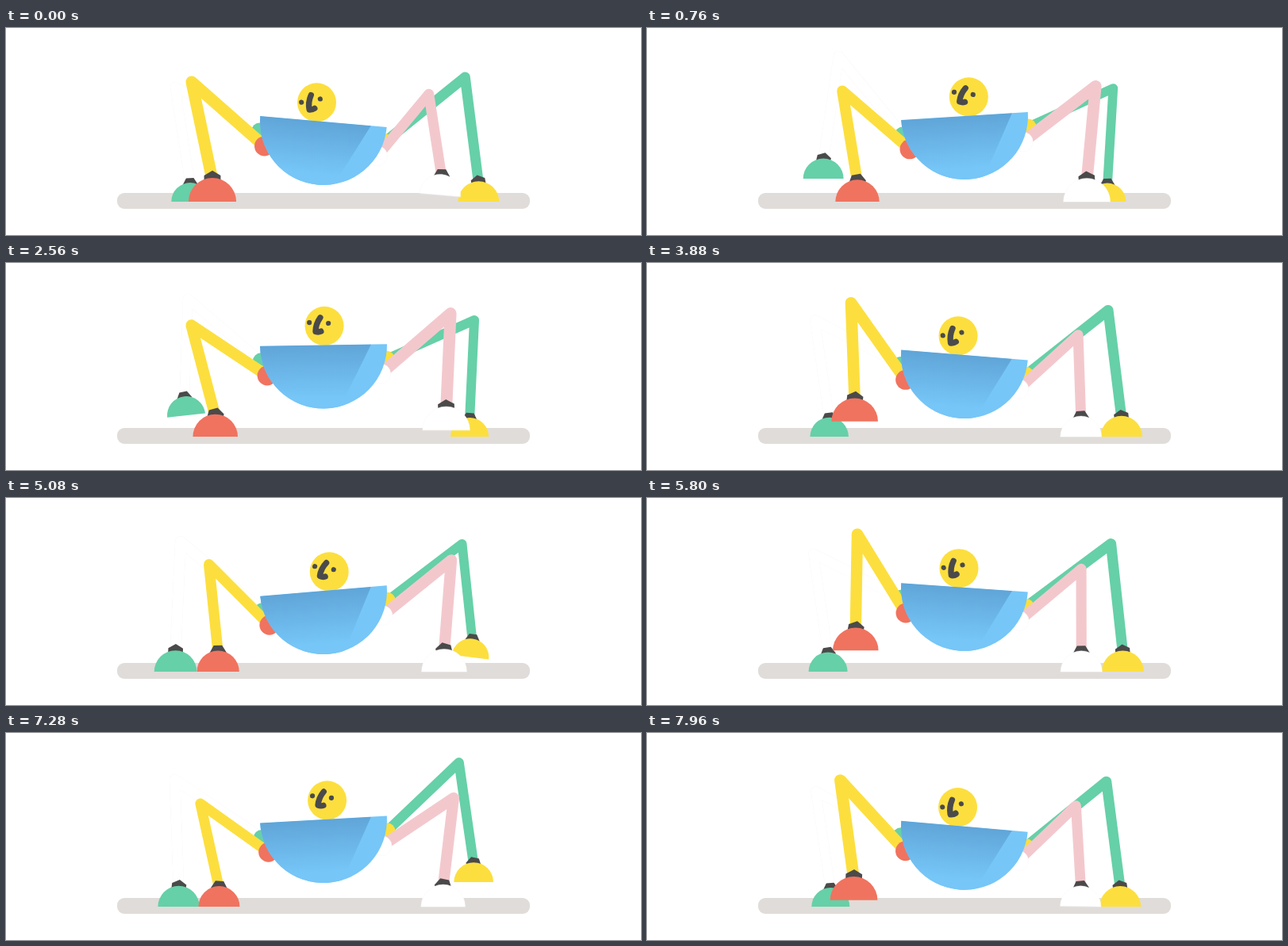
An HTML page with a canvas that plays this animation: 800x261 px, repeating every 8 s.

```html
<!DOCTYPE html>
<html lang="en">
<head>
<meta charset="utf-8">
<title>Walking robot</title>
<style>
html, body { margin: 0; width: 100%; height: 100%; overflow: hidden; background: #fff; }
canvas { display: block; width: 800px; height: 261px; }
</style>
</head>
<body>
<canvas id="stage"></canvas>
<script>
const W = 800, H = 261, FLOOR = 219, STEP = 2000, STANCE = 1360;
const TAU = Math.PI * 2, DEG = Math.PI / 180;
const YELLOW = '#fcdf3e', GREEN = '#66d0a8', RED = '#f0735f', PINK = '#f3c8cd';
const WHITE = '#ffffff', DARK = '#4b4a4b', BLUE = '#76c6f8', EDGE = '#f4f4f4';

// Far legs come first so the near ones cover them.
const FAR = { hip: [79, 19], hipR: 10.5, r: 27.1, out: 195.7, drift: 27.5, sway: 0.6 };
const NEAR = { hip: [71.5, 37.3], hipR: 12.5, r: 30.1, out: 147.6, drift: 9, sway: 0 };
const legs = [
  { ...FAR, side: -1, delay: 1000, len: 5.04, color: WHITE, foot: GREEN },
  { ...FAR, side: 1, delay: 1610, len: 5.04, color: GREEN, foot: YELLOW },
  { ...NEAR, side: -1, delay: 0, len: 4.06, color: YELLOW, foot: RED },
  { ...NEAR, side: 1, delay: 600, len: 3.9, color: PINK, foot: WHITE }
];

const canvas = document.getElementById('stage');
const ctx = canvas.getContext('2d');
const dpr = window.devicePixelRatio || 1;
canvas.width = W * dpr;
canvas.height = H * dpr;

function disc(x, y, r, color) {
  ctx.beginPath();
  ctx.arc(x, y, r, 0, TAU);
  paint(color);
}

function paint(color) {
  ctx.fillStyle = color;
  ctx.fill();
  if (color === WHITE) {
    ctx.strokeStyle = EDGE;
    ctx.lineWidth = 0.4;
    ctx.stroke();
  }
}

function turn([x, y], a) {
  const c = Math.cos(a), s = Math.sin(a);
  return [x * c - y * s, x * s + y * c];
}

function bodyAt(t) {
  const a = TAU * t / STEP;
  return { y: 110.5 + 7.5 * Math.cos(2 * a), tilt: 5 * DEG * Math.cos(a), swing: Math.cos(a) };
}

// depth runs 0 (front) to 1 (back) on the floor, then returns in the air
function footAt(leg, t) {
  const phase = (t - leg.delay + 2 * STEP) % STEP;
  let depth = phase / STANCE, lift = 0, tilt = 0;
  if (phase > STANCE) {
    const u = (phase - STANCE) / (STEP - STANCE);
    depth = 1 - u;
    lift = 31 * Math.pow(Math.sin(Math.PI * u), 0.8);
    if (u < 0.42) tilt = 7.3 * Math.sqrt(Math.sin(Math.PI * u / 0.42));
  }
  return {
    x: 407.6 + leg.side * (leg.out - leg.drift * depth + leg.sway * tilt),
    y: FLOOR - lift,
    r: leg.r - 4.38 * depth,
    tilt: leg.side * tilt * DEG,
    spin: -leg.side * 36 * depth * DEG
  };
}

function kneeAt(hip, ankle, thigh, shin, side) {
  const dx = ankle[0] - hip[0], dy = ankle[1] - hip[1], d = Math.hypot(dx, dy);
  const cos = (thigh * thigh + d * d - shin * shin) / (2 * thigh * d);
  const a = Math.atan2(dy, dx) - side * Math.acos(Math.max(-1, Math.min(1, cos)));
  return [hip[0] + thigh * Math.cos(a), hip[1] + thigh * Math.sin(a)];
}

function drawLeg(leg, t, body) {
  const foot = footAt(leg, t), r = foot.r;
  const h = turn([leg.side * leg.hip[0], leg.hip[1]], body.tilt);
  const hip = [400 + h[0], body.y + h[1]];
  const up = turn([0, -0.9 * r], foot.tilt);
  const ankle = [foot.x + up[0], foot.y + up[1]];
  const knee = kneeAt(hip, ankle, leg.len * r, leg.len * 1.036 * r, leg.side);

  ctx.beginPath();
  ctx.moveTo(...hip);
  ctx.lineTo(...knee);
  ctx.lineTo(...ankle);
  ctx.lineCap = ctx.lineJoin = 'round';
  if (leg.color === WHITE) {
    ctx.strokeStyle = EDGE;
    ctx.lineWidth = r * 0.5 + 0.4;
    ctx.stroke();
  }
  ctx.strokeStyle = leg.color;
  ctx.lineWidth = r * 0.5;
  ctx.stroke();
  disc(hip[0], hip[1], leg.hipR, leg.foot);

  ctx.save();
  ctx.translate(foot.x, foot.y);
  ctx.rotate(foot.tilt);
  ctx.beginPath();
  for (let i = 0; i < 6; i++) {
    const a = foot.spin - Math.PI / 2 + i * TAU / 6;
    ctx.lineTo(0.4 * r * Math.cos(a), -0.9 * r + 0.4 * r * Math.sin(a));
  }
  ctx.closePath();
  paint(DARK);
  ctx.beginPath();
  ctx.arc(0, 0, r, Math.PI, TAU);
  ctx.closePath();
  paint(leg.foot);
  ctx.restore();
}

function drawHead(t, body) {
  const blink = Math.max(0, 1 - Math.abs(t % 4000 - 1580) / 100);
  ctx.save();
  ctx.translate(399.5 - 8 * body.swing, body.y - 24.2);
  disc(0, 0, 24.5, YELLOW);
  ctx.rotate(-10 * DEG * body.swing);
  ctx.fillStyle = DARK;
  for (const x of [-19, 5]) {
    ctx.beginPath();
    ctx.ellipse(x, -3.5, 3.1, 3.1 * (1 - 0.9 * blink), 0, 0, TAU);
    ctx.fill();
  }
  ctx.beginPath();
  ctx.moveTo(-5.5, -10.3);
  ctx.bezierCurveTo(-9, -5, -11, 0, -10.8, 7.5);
  ctx.quadraticCurveTo(-7, 8.5, -4, 7);
  ctx.strokeStyle = DARK;
  ctx.lineWidth = 7.4;
  ctx.stroke();
  ctx.restore();
}

function drawBowl(body) {
  ctx.save();
  ctx.translate(400, body.y);
  ctx.rotate(body.tilt);
  ctx.beginPath();
  ctx.arc(0, 0, 80, 0, Math.PI);
  ctx.closePath();
  paint(BLUE);
  ctx.clip();
  const shade = ctx.createLinearGradient(0, 0, 0, 66);
  shade.addColorStop(0, '#60a5d8');
  shade.addColorStop(1, BLUE);
  ctx.beginPath();
  ctx.moveTo(-82, 0);
  ctx.lineTo(60, 0);
  ctx.lineTo(18, 82);
  ctx.lineTo(-82, 82);
  ctx.closePath();
  paint(shade);
  ctx.restore();
}

function draw(t) {
  const body = bodyAt(t % STEP);
  ctx.setTransform(dpr, 0, 0, dpr, 0, 0);
  ctx.fillStyle = WHITE;
  ctx.fillRect(0, 0, W, H);
  ctx.beginPath();
  ctx.roundRect(140, 208, 520, 20, 9);
  paint('#e0dcd9');
  for (const leg of legs) drawLeg(leg, t % STEP, body);
  drawHead(t, body);
  drawBowl(body);
}

const start = performance.now();
function tick() {
  draw((performance.now() - start) % 8000);
  requestAnimationFrame(tick);
}
tick();
</script>
</body>
</html>
```
